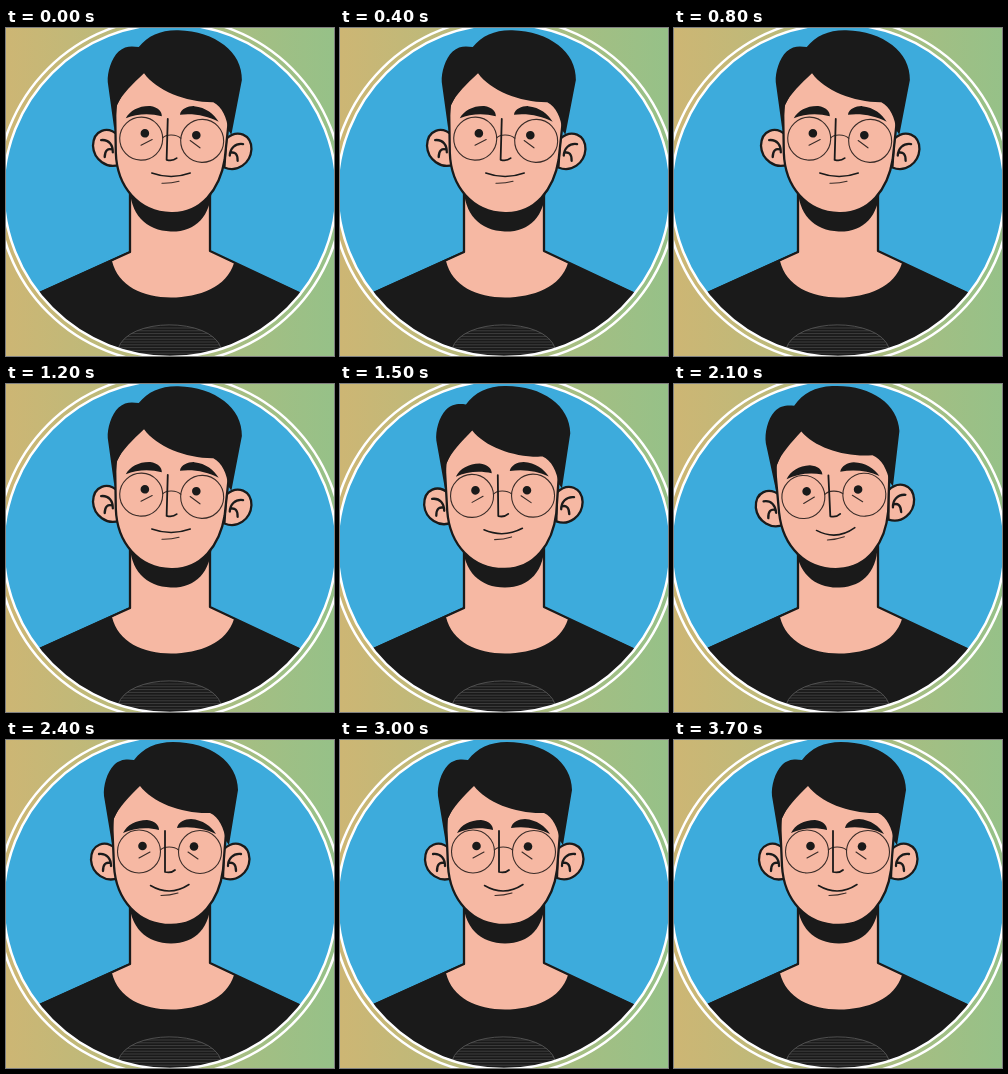
An HTML page that plays this animation: 328 by 328 pixels, repeating every 3800 ms.

```html
<!DOCTYPE html>
<html lang="en">
<head>
<meta charset="utf-8">
<title>Avatar</title>
<style>
  html, body { margin: 0; width: 100%; height: 100%; overflow: hidden; }
  svg { display: block; width: 100vw; height: 100vh; }
  .ink { fill: #1a1a1a; }
  .skin { fill: #f6b8a3; }
  .line { stroke: #1a1a1a; stroke-width: 2.3; stroke-linejoin: round; stroke-linecap: round; }
  .thin { fill: none; stroke: #3a2c28; stroke-width: 1.1; stroke-linecap: round; }
  .open { fill: none; }
</style>
</head>
<body>
<svg viewBox="0 0 328 328">
  <defs>
    <linearGradient id="backdrop">
      <stop offset="0" stop-color="#cdb674"/>
      <stop offset="1" stop-color="#96c188"/>
    </linearGradient>
    <clipPath id="disc"><circle cx="164" cy="162.5" r="166"/></clipPath>
    <clipPath id="print"><path d="M112 321C121 289 205 289 215 320V328H112Z"/></clipPath>
  </defs>

  <rect width="328" height="328" fill="url(#backdrop)"/>
  <circle cx="164" cy="162.5" r="166" fill="#3dabdc"/>

  <g clip-path="url(#disc)">
    <path class="ink" d="M20 270L124 223H204L306 270V330H20Z"/>
    <path class="skin" d="M124 160V224L106 233C112 258 137 269.500 165 269.500S221 259 228 235L204 223V160Z"/>
    <path class="open line" d="M124 160V224L20 271M204 160V223L306 271"/>
    <path id="hatch" clip-path="url(#print)" stroke="#4c4c4c" stroke-width=".7" fill="none"/>
    <path d="M112 321C121 289 205 289 215 320" fill="none" stroke="#555" stroke-width=".9"/>
  </g>

  <g id="head">
    <path class="ink" d="M123 158C123 188 141 203.500 165 203.500S205 188 205 158Z"/>
    <path class="skin line" d="M110 109C99 99 85 104 85 120C86 134 100 143 112 138Z"/>
    <path class="open line" d="M93 114C101 113 105 119 105 126M97 131C97 124 100 122 104 123"/>
    <path class="skin line" d="M218 109C229 99 243 104 243.500 119C243 133 230 143 217 138Z"/>
    <path class="open line" d="M235 114C227 113 222 119 222 126M230 131C230 124 227 122 223 123"/>
    <path class="skin line" d="M106 80L108 126C110 160 132 185 165 185C195 185 213 160 217 130L221 80L200 40H125Z"/>
    <path class="ink" d="M106 104L98 56C97 46 101 32 108 25C114 19 121 19 128 20C137 8 150 2 167 2C204 2 232 22 232 50L223 105L220 101C218 88 213 77 204 73C177 74 147 63 134 46C123 57 113 67 108 78Z"/>

    <g id="brows" class="ink">
      <path d="M117 93C121 85 130 80 141 80C149 81 153 85 153 90C141 87 128 88 117 93Z"/>
      <path d="M171 88C172 82 179 79 185 79C197 80 205 86 210 94C198 88 184 86 171 88Z"/>
    </g>
    <g id="eyes" class="ink">
      <ellipse cx="136.500" cy="106" rx="4.300"/>
      <ellipse cx="188" cy="106.500" rx="4.300"/>
    </g>
    <g class="thin">
      <circle cx="133" cy="111.500" r="21.500"/>
      <circle cx="194" cy="112" r="21.500"/>
      <path d="M154.500 110C158 106 168 106 172.500 110M133 118L144 112M182 112L192 119"/>
    </g>
    <path class="open line" style="stroke-width:1.8" d="M159 91V132Q165 133.500 169 130"/>
    <path id="mouth" class="open line" style="stroke-width:1.5"/>
    <path class="thin" d="M155 155.500Q164 155.500 172 153"/>
  </g>

  <g fill="none" stroke="#fff" stroke-width="2.5">
    <circle cx="164" cy="162.500" r="166.500"/>
    <circle cx="164" cy="162.500" r="172.500"/>
  </g>
</svg>
<script>
  const LOOP = 3800, STEP = 100;
  const byId = id => document.getElementById(id);
  const head = byId('head'), brows = byId('brows'), mouth = byId('mouth');
  const eyes = byId('eyes').children;

  // Smooth progress from 0 to 1 between two times.
  const ease = (t, from, to) => {
    const p = Math.min(1, Math.max(0, (t - from) / (to - from)));
    return p * p * (3 - 2 * p);
  };

  byId('hatch').setAttribute('d',
    Array.from({ length: 10 }, (_, i) => `M112 ${300 + i * 2.8}H216`).join(''));

  function draw(t) {
    const lean = ease(t, 1200, 1850), back = ease(t, 1950, 2400);
    const angle = 1.6 - 5.2 * lean + 3.6 * back;
    const blink = ease(t, 1700, 1900) - ease(t, 1900, 2100);
    head.setAttribute('transform', `rotate(${angle} 164 190)`);
    brows.setAttribute('transform', `translate(0 ${1.5 * lean - 1.5})`);
    for (const eye of eyes) eye.setAttribute('ry', 4.3 - 3.6 * blink);
    mouth.setAttribute('d', `M144.500 145.500Q164 ${152 + 5 * lean} 183 144.500`);
  }

  function tick(now) {
    draw(Math.floor(now % LOOP / STEP) * STEP);
    requestAnimationFrame(tick);
  }
  draw(0);
  requestAnimationFrame(tick);
</script>
</body>
</html>
```
